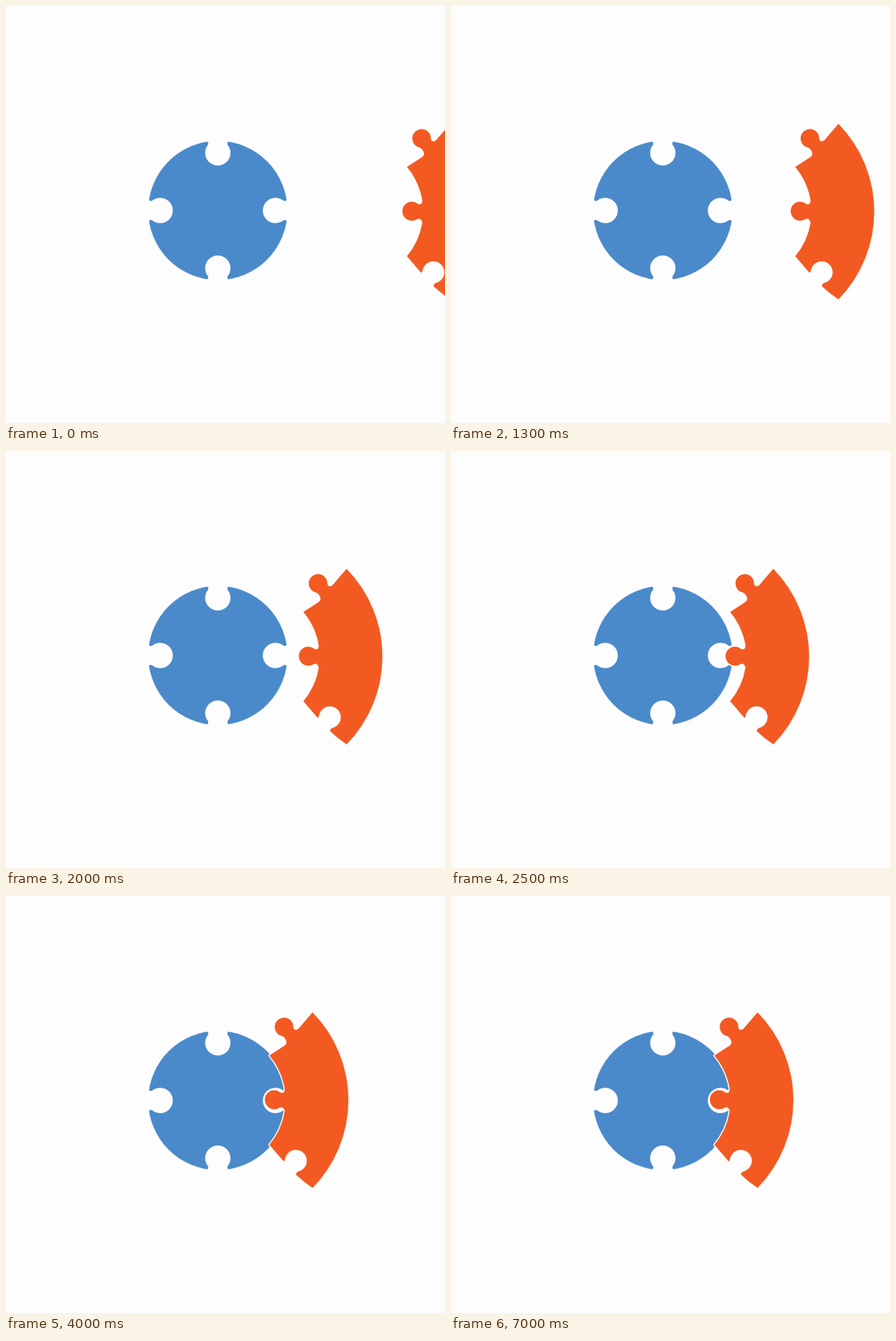
An HTML page for the animation above (7100 ms loop, 600 by 570 pixels).

```html
<!DOCTYPE html>
<html lang="en">
<head>
<meta charset="utf-8">
<title>Puzzle pieces</title>
<style>
  html, body { margin: 0; width: 100%; height: 100%; overflow: hidden; background: #fefdfe; }
  svg { display: block; width: 600px; height: 570px; }
  .paper { fill: #fefdfe; }
  .disc { fill: #4a8aca; stroke: #4a8aca; stroke-opacity: .3; }
  .arc { fill: #f35a22; stroke: #fefaf8; stroke-width: 3; stroke-linejoin: round; paint-order: stroke; }
</style>
</head>
<body>
<svg viewBox="0 0 600 570">
  <defs>
    <!-- Round hole with a flared mouth, pointing right -->
    <path id="socket" d="M98 -15.5 L95 -14.5 Q93 -12.5 90 -13.2
      A17.3 17.3 0 1 0 90 13.2 Q93 12.5 95 14.5 L98 15.5 Z"/>
  </defs>
  <g transform="translate(289.5 279.5)">
    <circle class="disc" r="95"/>
    <g class="paper">
      <use href="#socket"/>
      <use href="#socket" transform="rotate(90)"/>
      <use href="#socket" transform="rotate(180)"/>
      <use href="#socket" transform="rotate(270)"/>
    </g>
  </g>
  <path id="piece" class="arc" d="M419 161 A171.5 171.5 0 0 1 419 401
    Q407 393 397 383.5 Q395 381 399.5 378.6
    A15 15 0 1 0 381.2 362.5 Q380 366 378 363 L360 342
    A95 95 0 0 0 381 296 Q379 289 374 291.3
    A13 13 0 1 1 375 270.5 C378 272 381 271 381 266
    A95 95 0 0 0 360 220
    L380 207 Q386 203 381.5 197 Q380 194.5 377 193.3
    A12.7 12.7 0 1 1 392.7 181 C393 186 398 186 401 182 Z"/>
</svg>
<script>
  const LOOP = 7100, STEP = 100;
  const piece = document.getElementById("piece");

  // [time in ms, distance left to travel]
  const keys = [[0, 188], [900, 143.5], [1300, 110.5], [1600, 79.5],
                [2000, 46.5], [2500, 21.5], [3200, 1.5], [3600, 0], [LOOP, 0]];

  const slope = (a, b) => (b[1] - a[1]) / (b[0] - a[0]);

  function tangent(i) {
    if (i === 0) return -0.033;
    if (i >= keys.length - 2) return 0;
    const before = slope(keys[i - 1], keys[i]), after = slope(keys[i], keys[i + 1]);
    return 2 * before * after / (before + after);
  }

  // Smooth monotone curve through the keys
  function distance(t) {
    const i = keys.findIndex((key, n) => n < keys.length - 1 && t < keys[n + 1][0]);
    const [t0, d0] = keys[i], [t1, d1] = keys[i + 1];
    const span = t1 - t0, u = (t - t0) / span, v = 1 - u;
    return d0 * v * v * (1 + 2 * u) + d1 * u * u * (3 - 2 * u)
      + span * u * v * (tangent(i) * v - tangent(i + 1) * u);
  }

  function draw(now) {
    const t = Math.floor(now % LOOP / STEP) * STEP;
    const lift = 2 * Math.min(1, Math.max(0, (t - 2500) / 700));
    piece.setAttribute("transform", `translate(${distance(t)} ${-lift})`);
  }

  const start = performance.now();
  function tick() {
    draw(performance.now() - start);
    requestAnimationFrame(tick);
  }
  tick();
</script>
</body>
</html>
```
